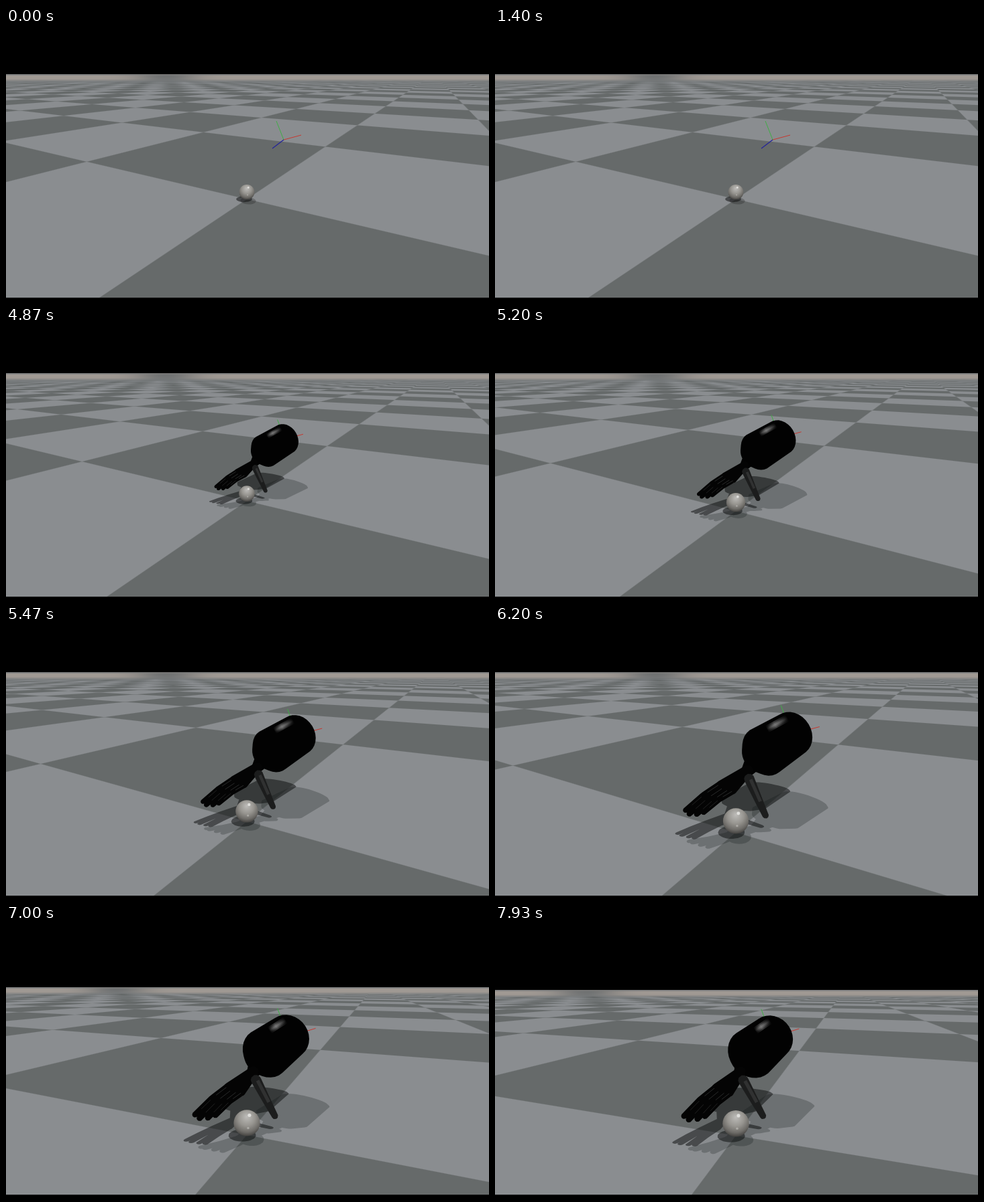
An HTML page with a canvas for the animation above (8000 ms loop, 720x405 px).

```html
<!DOCTYPE html>
<html lang="en">
<head>
<meta charset="utf-8">
<title>Hand over ball</title>
<style>
html, body { margin: 0; height: 100%; overflow: hidden; background: #000; }
canvas { display: block; width: 720px; height: 405px; }
</style>
</head>
<body>
<canvas id="stage" width="720" height="405"></canvas>
<script>
const W = 720, H = 405, FLOOR_END = 403, LOOP = 8000, STEP = 200 / 3;
const FOCAL = 452, CX = 359, CY = 202.5;
const ctx = document.getElementById('stage').getContext('2d');

// Vectors: x right, y up, z away; one floor tile is one unit.
const add = (a, b, k = 1) => a.map((v, i) => v + b[i] * k);
const mix = (a, b, k) => a.map((v, i) => v + (b[i] - v) * k);
const unit = a => a.map(v => v / Math.hypot(...a));
const cross = (a, b) => [
  a[1] * b[2] - a[2] * b[1], a[2] * b[0] - a[0] * b[2], a[0] * b[1] - a[1] * b[0]];

// time, distance, height, orbit angle (degrees), pitch
const CAMERA_KEYS = [
  [4800, 1.057, .4525, 0, .2872],
  [4867, 1.011, .444, 0, .2872],
  [5467, .702, .368, 0, .2872],
  [5733, .63, .351, 0, .2872],
  [6267, .606, .346, 0, .2872],
  [6600, .606, .346, 0, .2872],
  [6800, .606, .3325, 1.35, .2647],
  [7000, .606, .315, 8.35, .2377],
  [7200, .606, .311, 10.6, .2312],
  [7467, .606, .31, 11.3, .2293]
];

function cameraAt(time) {
  const keys = CAMERA_KEYS;
  let i = keys.findIndex(k => k[0] > time);
  if (i < 0) i = keys.length;
  const from = keys[Math.max(0, i - 1)], to = keys[Math.min(i, keys.length - 1)];
  const k = from === to ? 0 : (time - from[0]) / (to[0] - from[0]);
  const [, dist, height, degrees, pitch] = mix(from, to, k);
  const turn = degrees * Math.PI / 180;
  return { dist, height, sin: Math.sin(turn), cos: Math.cos(turn),
    sp: Math.sin(pitch), cp: Math.cos(pitch), horizon: CY - FOCAL * Math.tan(pitch), turn };
}

function project(cam, [x, y, z]) {
  const right = x * cam.cos - z * cam.sin;
  const ahead = x * cam.sin + z * cam.cos + cam.dist;
  const down = cam.height - y;
  const depth = ahead * cam.cp + down * cam.sp;
  const scale = FOCAL / depth;
  return [CX + right * scale, CY + (down * cam.cp - ahead * cam.sp) * scale, scale];
}

// Box-filtered checkerboard, so that far tiles blend smoothly.
const TILE = 30.6 * Math.PI / 180, TS = Math.sin(TILE), TC = Math.cos(TILE);
const DARK = [102, 106, 106], LIGHT = [138, 141, 144], HAZE = [160, 153, 147];
const saw = x => Math.abs(x / 2 - Math.floor(x / 2) - .5);
const wave = (x, w) => 2 * (saw(x - w / 2) - saw(x + w / 2)) / w;
const clamp = x => Math.max(0, Math.min(1, x));

function paintFloor(cam, image) {
  const px = image.data;
  const diagonal = CX + FOCAL / cam.cp * Math.tan(TILE - Math.PI / 4 - cam.turn);
  // Tile axes in the camera's right/ahead basis
  const ar = TS * cam.cos - TC * cam.sin, aa = TS * cam.sin + TC * cam.cos;
  for (let y = 0; y < H; y++) {
    const v = y + .5 - CY;
    const drop = FOCAL * cam.sp + v * cam.cp;
    const lit = drop > .3 && y < FLOOR_END;
    const per = cam.height / drop;
    const ahead = per * (FOCAL * cam.cp - v * cam.sp) - cam.dist;
    const dAhead = -per * FOCAL / drop;
    const below = y + .5 - cam.horizon;
    for (let x = 0; x < W; x++) {
      const o = (y * W + x) * 4;
      px[o + 3] = 255;
      if (!lit) { px[o] = px[o + 1] = px[o + 2] = 0; continue; }
      const u = x + .5 - CX, right = u * per, dRight = -right * cam.cp / drop;
      const wa = Math.abs(per * ar) + Math.abs(dRight * ar + dAhead * aa);
      const wb = Math.abs(per * aa) + Math.abs(dAhead * ar - dRight * aa);
      const a = right * ar + ahead * aa, b = ahead * ar - right * aa;
      const tone = .5 - .5 * wave(a, wa) * wave(b, wb);
      const streak = Math.exp(-(((x - diagonal) / 45) ** 2));
      const haze = below < 1.6 ? .3 : clamp((11 - below) / 4) * (1 - .85 * streak);
      for (let c = 0; c < 3; c++) {
        const base = DARK[c] + (LIGHT[c] - DARK[c]) * tone;
        px[o + c] = base + (HAZE[c] - base) * haze - streak * clamp((14 - below) / 10) * 14;
      }
    }
  }
}

// Solids are point clouds; their outline is the hull of the projected points.
const BALL = { at: [0, .0285, 0], r: .0285 };

function sphere([x, y, z], r, n = 36) {
  return Array.from({ length: n }, (_, i) => {
    const h = 1 - 2 * (i + .5) / n, s = Math.sqrt(1 - h * h) * r, q = i * 2.39996;
    return [x + s * Math.cos(q), y + h * r, z + s * Math.sin(q)];
  });
}
const limb = (a, ra, b, rb) => [...sphere(a, ra), ...sphere(b, rb)];

const ARM_END = [.1655, .17, .2775], ARM_FRONT = [.068, .145, .154], WRIST = [.029, .119, .0867];
const ARM_AXIS = unit(add(ARM_FRONT, ARM_END, -1));
const ARM_SIDE = unit(cross(ARM_AXIS, [0, 1, 0])), ARM_UP = cross(ARM_SIDE, ARM_AXIS);

const armPoint = (t, r, q) => add(add(add(ARM_END, ARM_AXIS, t),
  ARM_SIDE, r * Math.cos(q)), ARM_UP, r * Math.sin(q));
const ring = (t, r) => Array.from({ length: 32 }, (_, i) => armPoint(t, r, i * Math.PI / 16));

const forearm = [...ring(-.006, .06), ...ring(.004, .068), ...ring(.155, .067), ...ring(.185, .046)];
const wrist = [...ring(.18, .03), ...sphere(WRIST, .016)];

const TIPS = [[-.109, .058, -.006], [-.1, .053, -.014], [-.083, .056, -.021], [-.068, .0625, -.025]];
const fingers = TIPS.map((tip, i) => {
  const knuckle = add(mix(WRIST, tip, .45), [.004 * i - .004, .007 - .005 * i, 0]);
  const joint = add(mix(knuckle, tip, .5), [0, .004, 0]);
  return { knuckle, joint, tip };
});
const palm = [...sphere(WRIST, .013), ...fingers.flatMap(f => sphere(f.knuckle, .008))];
const fingerParts = fingers.flatMap(({ knuckle, joint, tip }) => [
  limb(knuckle, .0075, joint, .0068), limb(joint, .0068, tip, .0062)]);

const THUMB = [[.032, .103, .07], [.054, .058, .044], [.0685, .029, .027]];
const thumbParts = [limb(THUMB[0], .0125, THUMB[1], .0095), limb(THUMB[1], .0095, THUMB[2], .0075)];

const handParts = [forearm, wrist, palm, ...fingerParts, ...thumbParts];
const ballParts = [sphere(BALL.at, BALL.r, 120)];

function hull(points) {
  const sorted = [...points].sort((a, b) => a[0] - b[0] || a[1] - b[1]);
  const chain = list => {
    const out = [];
    for (const p of list) {
      while (out.length > 1) {
        const [a, b] = out.slice(-2);
        if ((b[0] - a[0]) * (p[1] - a[1]) - (b[1] - a[1]) * (p[0] - a[0]) > 0) break;
        out.pop();
      }
      out.push(p);
    }
    return out.slice(0, -1);
  };
  return [...chain(sorted), ...chain(sorted.reverse())];
}

function outline(cam, parts, place = p => p) {
  const path = new Path2D();
  for (const part of parts) {
    hull(part.map(p => project(cam, place(p)))).forEach(([x, y], i) =>
      i ? path.lineTo(x, y) : path.moveTo(x, y));
    path.closePath();
  }
  return path;
}

function fill(path, style) {
  ctx.fillStyle = style;
  ctx.fill(path);
}

function line(cam, from, to, style, width) {
  const [x1, y1] = project(cam, from), [x2, y2] = project(cam, to);
  ctx.strokeStyle = style;
  ctx.lineWidth = width;
  ctx.beginPath();
  ctx.moveTo(x1, y1);
  ctx.lineTo(x2, y2);
  ctx.stroke();
}

// Two lights: shadow shift per unit of height, and darkness
const LIGHTS = [[-.35, .03, .52], [.176, -.545, .23]];

function drawShadows(cam, parts) {
  for (const [sx, sz, dark] of LIGHTS) {
    const drop = ([x, y, z]) => [x + sx * y, 0, z + sz * y];
    fill(outline(cam, parts, drop), `rgba(12,14,14,${dark})`);
  }
}

function drawAxes(cam) {
  const origin = [.1655, .1696, .2775];
  line(cam, origin, [.2348, .1995, .234], '#c8372f', 1);
  line(cam, origin, [.129, .2555, .268], '#3fae45', 1);
  line(cam, origin, [.1085, .1486, .198], '#23239c', 1.2);
}

function drawForearmShine(cam) {
  const top = Math.PI / 2 - .25;
  const a = armPoint(.05, .067, top), b = armPoint(.155, .067, top);
  const [x1, y1, scale] = project(cam, a), [x2, y2] = project(cam, b);
  const shine = ctx.createLinearGradient(x1, y1, x2, y2);
  shine.addColorStop(0, 'rgba(150,150,150,0)');
  shine.addColorStop(.6, 'rgba(150,150,150,.4)');
  shine.addColorStop(1, 'rgba(150,150,150,0)');
  for (const width of [.02, .012, .005]) line(cam, a, b, shine, width * scale);
}

function drawHand(cam) {
  fill(outline(cam, [forearm, wrist]), '#020202');
  drawForearmShine(cam);
  fill(outline(cam, [palm, ...fingerParts]), '#040404');
  for (const { knuckle, joint, tip } of fingers) {
    const lift = [.004, .003, 0];
    line(cam, add(mix(knuckle, joint, .2), lift), add(mix(knuckle, joint, .85), lift), 'rgba(120,122,122,.4)', .8);
    line(cam, add(mix(joint, tip, .2), lift), add(mix(joint, tip, .75), lift), 'rgba(120,122,122,.3)', .8);
  }
  fill(outline(cam, thumbParts), '#1c1d1d');
  const lift = [.003, 0, -.004];
  const scale = project(cam, THUMB[1])[2];
  line(cam, add(THUMB[0], lift), add(THUMB[1], lift), '#303131', .008 * scale);
}

function drawBall(cam) {
  const [x, y, scale] = project(cam, BALL.at), r = BALL.r * scale;
  const shade = ctx.createRadialGradient(x, y - r * .5, 0, x, y - r * .3, r * 1.4);
  shade.addColorStop(0, '#bdbcb9');
  shade.addColorStop(.45, '#96948f');
  shade.addColorStop(.75, '#6d6b67');
  shade.addColorStop(1, '#343331');
  const disc = (dx, dy, size, style) => {
    ctx.fillStyle = style;
    ctx.beginPath();
    ctx.arc(x + dx * r, y + dy * r, size * r, 0, 7);
    ctx.fill();
  };
  disc(0, 0, 1, shade);
  disc(.2, -.6, .13, 'rgba(240,240,238,.75)');
  disc(.1, .38, .09, 'rgba(225,224,220,.4)');
}

const floor = ctx.createImageData(W, H);
let shown = -1, floorKey = '';

function render(time) {
  const cam = cameraAt(time), key = JSON.stringify(cam);
  if (key !== floorKey) paintFloor(cam, floor);
  floorKey = key;
  ctx.putImageData(floor, 0, 0);
  const hasHand = time > 1930;
  drawShadows(cam, hasHand ? [...ballParts, ...handParts] : ballParts);
  drawAxes(cam);
  if (hasHand) drawHand(cam);
  drawBall(cam);
}

function tick() {
  const step = Math.floor((performance.now() % LOOP + 4) / STEP) % (LOOP / STEP);
  if (step !== shown) render(step * STEP);
  shown = step;
  requestAnimationFrame(tick);
}
tick();
</script>
</body>
</html>
```
